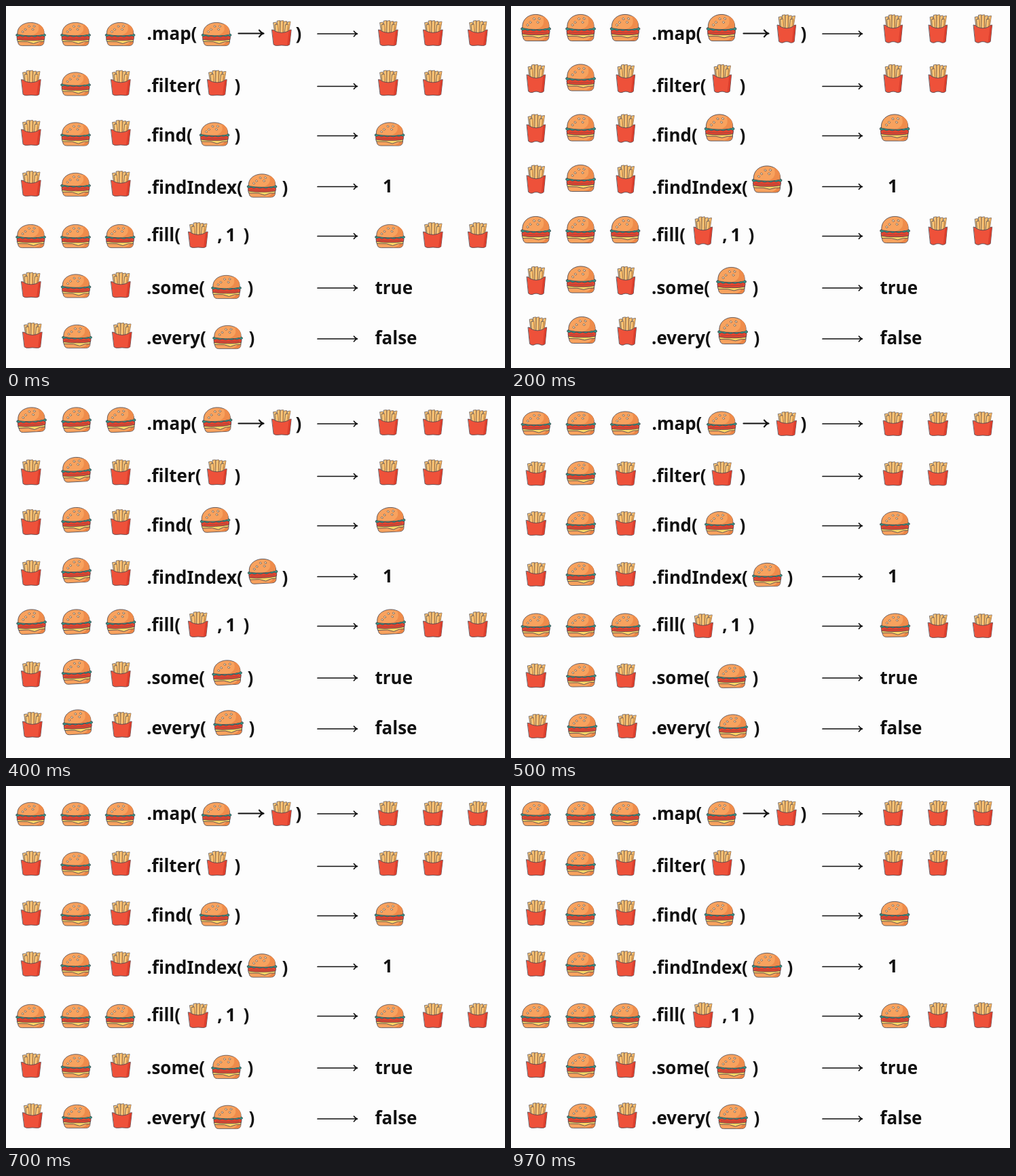
Animation, 735 px wide and 534 px high, one loop 1000 ms. Source, as an HTML page with a canvas:

```html
<!DOCTYPE html>
<html lang="en">
<head>
<meta charset="utf-8">
<title>Array methods</title>
<style>
  html, body { margin: 0; width: 100%; height: 100%; overflow: hidden; background: #fdfdfd; }
  canvas { display: block; }
</style>
</head>
<body>
<canvas id="stage" width="735" height="534"></canvas>
<script>
const ctx = document.getElementById('stage').getContext('2d');
const LOOP = 1000, INK = '#484650', BUN = '#f8a25e', RED = '#ee513a';

// Columns: time, top and bottom relative to the ground line, tilt in degrees
const burgerKeys = [
  [0, -35, 0, 0], [70, -36, 0, 0], [100, -40, -1.5, 0], [130, -44, -4, 0],
  [200, -47, -7, 0], [270, -47.5, -8, 0], [330, -46, -7.5, -1], [400, -42.5, -5.5, -3],
  [470, -38, -2.5, -2], [530, -35, 0, 0], [600, -35, 0, 0], [800, -35.3, 0, 0],
  [970, -36.5, 0, 0], [1000, -35, 0, 0]
];
const friesKeys = [
  [0, -38, 0, 0], [70, -38.5, 0, 0], [100, -40, -.5, 0], [130, -43, -1.7, 0],
  [200, -46.7, -4.2, 0], [270, -46.7, -4.5, 0], [330, -43.5, -3, 0], [400, -39, -1, 0],
  [500, -36, 0, 0], [600, -36, 0, 0], [800, -37.7, 0, 0], [1000, -38, 0, 0]
];

// Icons: kind, ground line, centre positions
const icons = [
  ['b', 59, 36.5, 102.5, 168, 310], ['f', 59, 406, 563, 629, 695],
  ['b', 132.5, 102.5], ['f', 132.5, 37, 169, 311, 563, 629],
  ['b', 206.5, 102.5, 307, 565], ['f', 206, 37, 169],
  ['b', 281, 102.5], ['b', 282.5, 377], ['f', 281, 37, 169],
  ['b', 357, 36.5, 102.5, 168, 565.5], ['f', 357, 283, 629, 695],
  ['b', 430.5, 103], ['b', 432, 324.5], ['f', 430.5, 37, 169],
  ['b', 505, 104.5], ['b', 506, 326.5], ['f', 505, 39, 171]
];

// Rows: method, x, baseline, x of closing bracket, arrow y
const rows = [
  ['.map(', 207.5, 50, 431, 41],
  ['.filter(', 207, 127, 341, 118.5],
  ['.find(', 207, 200, 341, 191.5],
  ['.findIndex(', 207.5, 277, 411, 266.5],
  ['.fill(', 207, 347, 354, 339.5],
  ['.some(', 207, 424.5, 360, 416],
  ['.every(', 207, 499, 362, 491]
];

function sample(keys, t) {
  let i = 1;
  while (i < keys.length - 1 && keys[i][0] < t) i++;
  const a = keys[i - 1], b = keys[i];
  const k = (t - a[0]) / (b[0] - a[0]);
  return [1, 2, 3].map(n => a[n] + (b[n] - a[n]) * k);
}

// The picture is held for uneven steps that repeat every 200 ms
function held(t) {
  const part = t % 200;
  return t - part + [170, 130, 100, 70, 0].find(s => s <= part);
}

function paint(d, fill, line = .8) {
  const p = new Path2D(d);
  if (fill) { ctx.fillStyle = fill; ctx.fill(p); }
  if (line) { ctx.strokeStyle = INK; ctx.lineWidth = line; ctx.stroke(p); }
}

function burger([top, bottom, tilt]) {
  const h = bottom - top, drape = h > 38 ? 30.5 : 31.5;
  ctx.translate(0, top);
  ctx.rotate(tilt * Math.PI / 180);
  ctx.scale(1, h / 35);
  paint('M-19 27H19.5Q20 34.6 13 34.6H-13Q-19.5 34.6-19 27Z', BUN);
  paint('M19 28Q19.5 34 13 34.2H4Q14 33 15 28Z', '#ec8545', 0);
  paint(`M-20 25H20L19 28.5L12 28.7L4 ${drape}L-5 28.7L-19 28.5Z`, '#fdd566');
  paint('M-19.5 19.5H19.5Q21.5 22 19.8 25.5Q10 27.2 0 26.8Q-10 27.2-19.8 25.5Q-21.5 22-19.5 19.5Z', '#e6452f');
  paint('M-17 23.5Q0 25.2 17 23.5', '', .4);
  paint('M-20 17Q-23 18-21.5 20Q-19 21.8-16 19.8Q-12 22.5-8 20.3Q-3 22.5 1 20.5Q6 22.6 10 20.2Q14 22 17 19.8Q20 21.8 21.8 19.8Q23 18 20 17Z', '#2f9e89');
  paint('M-19.5 18C-21 7-11 .4 0 .4S21 7 19.5 18Q10 20 0 19.8Q-10 20-19.5 18Z', BUN);
  paint('M10 2.3C19 5.5 20.2 12 19 17.6Q11 19.3 2 19.3Q16 15 10 2.3Z', '#ef8c4b', 0);
  for (const [x, y] of [[-8, 10.5], [-2.5, 6], [5, 5.8], [3, 10.5], [-12, 14]]) {
    ctx.beginPath();
    ctx.ellipse(x, y, 1.5, 1.2, .4, 0, 7);
    ctx.fillStyle = '#ffe2b5';
    ctx.fill();
    ctx.lineWidth = .6;
    ctx.stroke();
  }
}

function stick(base, x, y) {
  paint(`M${base - 2.4} 24L${x - 2.4} ${y + .6}L${x + 2} ${y}L${base + 2.2} 24Z`, '#fbc779', .7);
  paint(`M${base + .8} 24L${x + .8} ${y + .4}L${x + 2} ${y}L${base + 2.2} 24Z`, '#e9a04c', 0);
}

function fries([top, bottom]) {
  const h = bottom - top, arch = 36.5 - Math.max(0, h - 38) * .4;
  ctx.translate(0, top);
  ctx.scale(Math.pow(38 / h, .4), h / 38);
  stick(-7, -10, 3);
  stick(7, 11, 2);
  stick(-3, -4.5, .5);
  stick(4, 5.5, 1.5);
  stick(0, .5, .5);
  stick(-6, -7.5, 6);
  stick(6, 8, 6);
  paint(`M-14.2 14Q-11 14-9.5 16.2Q0 20.5 9.5 16.2Q11 14 14.2 14L11.7 36Q9 38 6 37.4Q0 ${arch} -6 37.4Q-9 38-11.7 36Z`, RED);
  paint('M14 14.6L11.5 35.8Q9.5 37.3 8 37L10.8 16Q12 14.5 14 14.6Z', '#dc3f2d', 0);
}

function arrow(x, end, y, width, head) {
  ctx.beginPath();
  ctx.moveTo(x, y);
  ctx.lineTo(end, y);
  ctx.moveTo(end - head, y - head * .75);
  ctx.quadraticCurveTo(end - head * .5, y - .5, end, y);
  ctx.quadraticCurveTo(end - head * .5, y + .5, end - head, y + head * .75);
  ctx.strokeStyle = '#111';
  ctx.lineWidth = width;
  ctx.stroke();
}

function text(s, x, y, align = 'left') {
  ctx.textAlign = align;
  ctx.fillText(s, x, y);
}

function labels() {
  ctx.font = '700 26px "Noto Sans", "Open Sans", sans-serif';
  ctx.fillStyle = '#111';
  for (const [name, x, y, close, mid] of rows) {
    text(name, x, y);
    text(')', close, y, 'center');
    arrow(459, 517.5, mid, 1.7, 5);
  }
  arrow(342.5, 379.5, 40.5, 2.2, 6.5);
  text(',', 315, 347, 'center');
  text('1', 331, 347, 'center');
  text('1', 562.5, 275, 'center');
  text('true', 543.5, 424.5);
  text('false', 543.5, 499);
}

function draw(t) {
  ctx.fillStyle = '#fdfdfd';
  ctx.fillRect(0, 0, 735, 534);
  ctx.lineJoin = ctx.lineCap = 'round';
  labels();
  const b = sample(burgerKeys, t), f = sample(friesKeys, t);
  for (const [kind, ground, ...xs] of icons) {
    for (const x of xs) {
      ctx.save();
      ctx.translate(x, ground);
      if (kind === 'b') burger(b);
      else fries(f);
      ctx.restore();
    }
  }
}

const start = performance.now();
function tick() {
  draw(held((performance.now() - start) % LOOP));
  requestAnimationFrame(tick);
}
tick();
</script>
</body>
</html>
```
